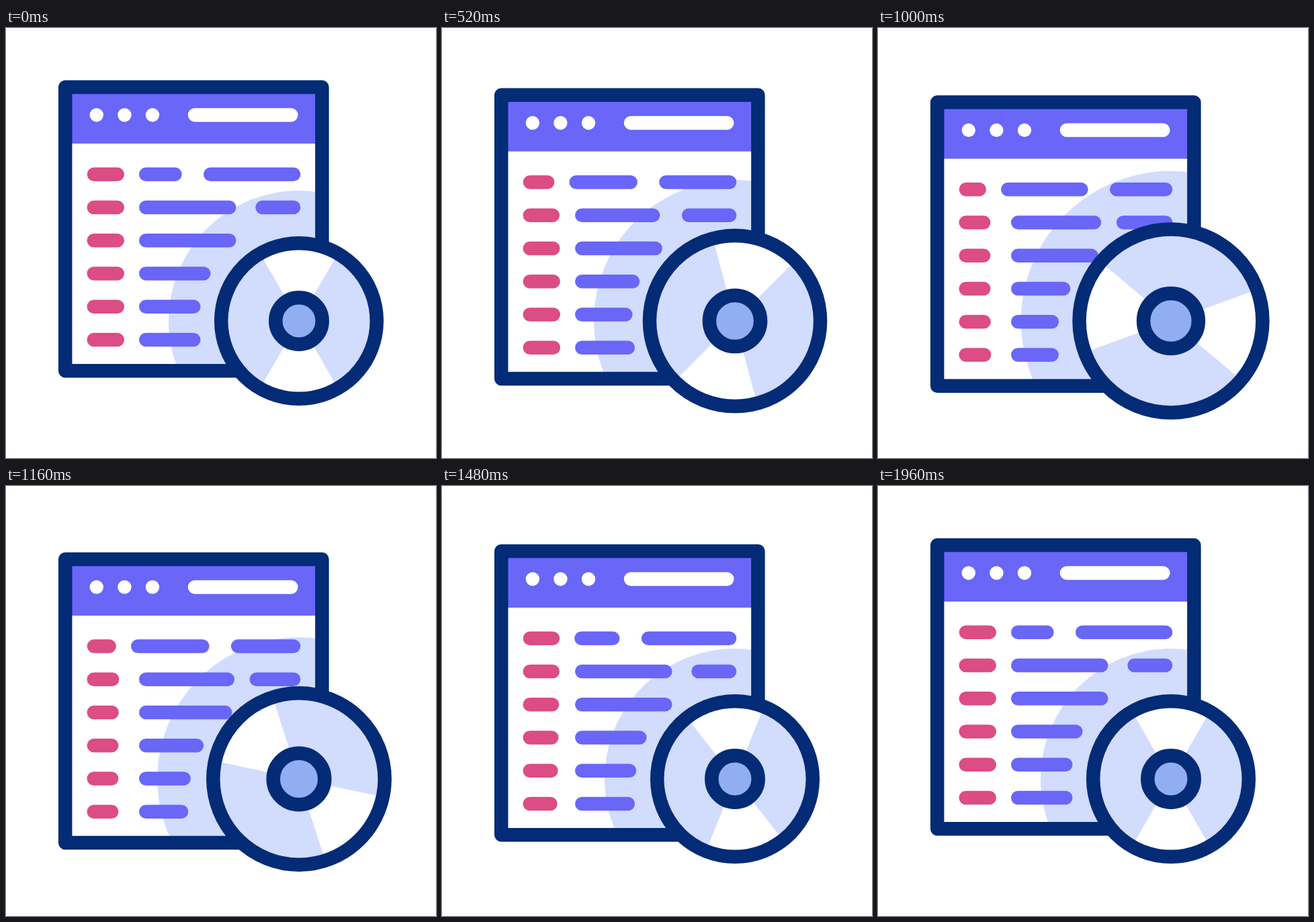
Recreate the animation shown at these times as an HTML page. Size 640x640 px, loop 2000 ms.

```html
<!DOCTYPE html>
<html lang="en">
<head>
<meta charset="utf-8">
<title>Software window and disc</title>
<style>
  html, body { margin: 0; width: 100%; height: 100%; overflow: hidden; background: #fff; }
  svg { display: block; width: 100vw; height: 100vh; }
  .edge { fill: none; stroke: #032b76; stroke-width: 20.5; stroke-linejoin: round; }
  .bar { fill: none; stroke-width: 20.5; stroke-linecap: round; }
</style>
</head>
<body>
<svg viewBox="0 0 640 640">
  <defs>
    <clipPath id="pane"><rect x="88" y="88" width="382" height="422"/></clipPath>
  </defs>
  <g id="win">
    <g clip-path="url(#pane)">
      <circle id="halo" cx="436" fill="#d2dcfd"/>
    </g>
    <rect x="88" y="88" width="382" height="84" fill="#6966f8"/>
    <g fill="#fff">
      <circle cx="134.8" cy="129.5" r="10.2"/>
      <circle cx="176.4" cy="129.5" r="10.2"/>
      <circle cx="218" cy="129.5" r="10.2"/>
    </g>
    <path class="bar" stroke="#fff" d="M281 129.5H424.3"/>
    <g id="bars"></g>
    <rect class="edge" x="88.2" y="88" width="382.2" height="422.2"/>
  </g>
  <g transform="translate(436 436)">
    <g id="disc">
      <circle r="115.7" fill="#d2dcfd"/>
      <path fill="#fff" d="M0 0L-57.9 -100.2A115.7 115.7 0 0 1 57.9 -100.2L-57.9 100.2A115.7 115.7 0 0 0 57.9 100.2Z"/>
    </g>
    <circle id="rim" class="edge"/>
    <circle id="hub" class="edge" style="fill:#92aef2"/>
  </g>
</svg>
<script>
const LOOP = 2000, STEP = 40, CAP = 10.25;
const PINK = '#dc4c85', VIOLET = '#6966f8';
const el = id => document.getElementById(id);

const smooth = (t, a, b) => {
  const p = Math.min(1, Math.max(0, (t - a) / (b - a)));
  return p * p * (3 - 2 * p);
};
// Rises from a to b, holds, falls from c to d.
const pulse = (a, b, c, d) => t => smooth(t, a, b) - smooth(t, c, d);
const bell = mid => pulse(mid - 600, mid - 40, mid + 40, mid + 600);

// Smooth curve through [time, value] points.
function curve(points) {
  const last = points.length - 1;
  const slope = i => {
    if (i === 0 || i === last) return 0;
    const [t0, v0] = points[i - 1], [t1, v1] = points[i + 1];
    return (v1 - v0) / (t1 - t0);
  };
  return t => {
    if (t >= points[last][0]) return points[last][1];
    const i = points.findIndex(p => p[0] > t) - 1;
    const [t0, v0] = points[i], [t1, v1] = points[i + 1];
    const h = t1 - t0, p = (t - t0) / h, q = 1 - p;
    return q * q * ((1 + 2 * p) * v0 + p * h * slope(i))
         + p * p * ((1 + 2 * q) * v1 - q * h * slope(i + 1));
  };
}

const drop = pulse(145, 878, 1026, 1828);
const swell = bell(845);
const spin = curve([[0, 0], [180, 0.2], [320, 2.3], [680, 32], [1000, 100],
                    [1320, 158.4], [1640, 179], [1800, 180]]);

// row, colour, left, right, shift of left, shift of right, motion
const first = pulse(180, 800, 1000, 1560);
const bars = [
  [0, PINK, 120.7, 176, 0, -15, first],
  [0, VIOLET, 198, 261.7, -15, 51, first],
  [0, VIOLET, 294, 438.3, 51, 0, first],
  [1, VIOLET, 371.3, 438.3, -18.5, 0, pulse(130, 690, 892, 1408)]
];
[342.5, 342.5, 304.5, 289.5, 289.5].forEach((right, i) => {
  bars.push([i + 1, PINK, 120.5, 176, 0, -8.6, bell(1000 + 40 * i)]);
  bars.push([i + 1, VIOLET, 198, right, 0, -20.6, bell(680 + 80 * i)]);
});
const lines = bars.map(([, colour]) => {
  const line = document.createElementNS('http://www.w3.org/2000/svg', 'path');
  line.setAttribute('class', 'bar');
  line.setAttribute('stroke', colour);
  return el('bars').appendChild(line);
});

function draw(t) {
  const y = 22.6 * drop(t), k = swell(t), scale = 1 + 0.2 * k;
  el('win').setAttribute('transform', `translate(0 ${y})`);
  el('halo').setAttribute('cy', 436 - y);
  el('halo').setAttribute('r', 194 + 32.7 * k);
  el('disc').setAttribute('transform', `rotate(${spin(t)}) scale(${scale})`);
  el('rim').setAttribute('r', 115.8 * scale);
  el('hub').setAttribute('r', 34.7 * scale);
  bars.forEach(([row, , left, right, dl, dr, move], i) => {
    const m = move(t);
    const x0 = left + dl * m + CAP, x1 = right + dr * m - CAP;
    lines[i].setAttribute('d', `M${x0} ${217.7 + 49.25 * row}H${x1}`);
  });
}

function tick() {
  const t = performance.now() % LOOP;
  draw(Math.floor(t / STEP) * STEP);
  requestAnimationFrame(tick);
}
tick();
</script>
</body>
</html>
```
